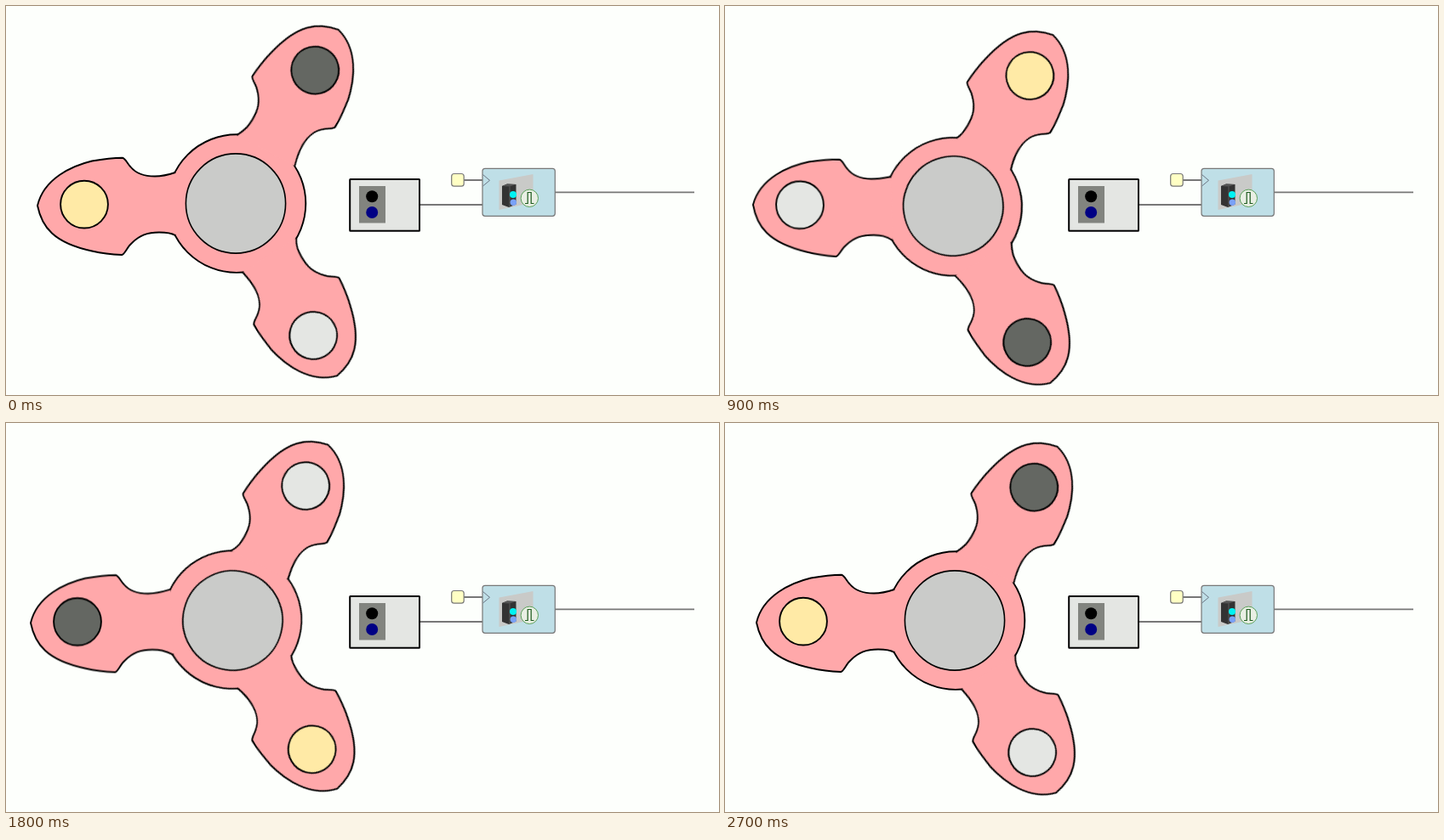
These frames come from a looping animation (838x458 px, 3600 ms). An HTML page:

```html
<!DOCTYPE html>
<html lang="en">
<head>
<meta charset="utf-8">
<title>Spinner and light sensor</title>
<style>
  html, body { margin: 0; width: 100%; height: 100%; overflow: hidden; background: #fdfffc; }
  svg { display: block; width: 838px; height: 458px; }
  #spinner { transform-origin: 268.25px 233.5px; }
  #pulse { opacity: 0; }
</style>
</head>
<body>
<svg viewBox="0 0 838 458" fill="none">
  <g id="wires" stroke="#777" stroke-width="1.8">
    <path d="M486 234H560M645 219.4H809M538 205H560"/>
  </g>

  <g id="sensor">
    <rect x="404.2" y="204" width="81.8" height="60.8" rx=".5" fill="#e4e6e3" stroke="#000" stroke-width="2"/>
    <rect x="415" y="212" width="31" height="43.5" fill="#82847f"/>
    <circle cx="430.2" cy="224.3" r="7" fill="#000"/>
    <circle cx="430.2" cy="243" r="7" fill="#000084"/>
  </g>

  <g id="block">
    <rect x="523.7" y="197.5" width="14.5" height="14.7" rx="3" fill="#ffffc4" stroke="#777" stroke-width="1.2"/>
    <rect x="560" y="191.3" width="85.3" height="56" rx="3" fill="#bfdfe7" stroke="#777" stroke-width="1.2"/>
    <path d="M560.5 198.5L568.5 205.3L560.5 212" stroke="#6b7684"/>
    <path d="M579.5 205.5L619.5 198V231.5L579.5 240Z" fill="#c9cac8"/>
    <path d="M583 212L589 209.5L599.5 210V233.5L591 237L583 234Z" fill="#333"/>
    <path d="M583 212L589 209.5L599.5 210L592 212.5Z" fill="#555"/>
    <path d="M592 212.5V236.5" stroke="#666" stroke-width=".8"/>
    <circle cx="596" cy="222" r="4" fill="#00f2f2"/>
    <circle cx="596.3" cy="231.3" r="3.7" fill="#7aa2f8"/>
    <circle cx="615.3" cy="226.3" r="10.2" fill="#e9efe4" stroke="#5aa05a"/>
    <path d="M610 232.5H613.2V219.5H617.2V232.5H620.5" stroke="#1d5a1d" stroke-width="1.2"/>
  </g>

  <g id="pulse">
    <path d="M686.2 214.5V155.8H701.2V214.5" stroke="#008000" stroke-width="3"/>
    <ellipse cx="677.7" cy="214.4" rx="9.5" ry="3.4" fill="#008000"/>
    <ellipse cx="709.5" cy="214.4" rx="9.5" ry="3.4" fill="#008000"/>
    <path d="M691 166.3V171.3M696 166.3V171.3M689 179.3Q693.3 185.3 697.8 179.3" stroke="#1a6a1a"/>
  </g>

  <g id="spinner" stroke="#000" stroke-width="1.9" fill="#ffa8aa">
    <circle cx="271" cy="232.6" r="81.3"/>
    <g id="arms"></g>
    <circle cx="270" cy="232.5" r="58.6" fill="#cacbc9" stroke-width="1.6"/>
  </g>
</svg>

<script>
const LOOP = 3600, BEAT = 450, TICK = 150;
const $ = id => document.getElementById(id);

// One arm pointing left; only its joints with the hub differ.
const armPath = (top, bottom) =>
  `M${top}C190 199 184 200.5 175 200.5C160 200.5 151 195 146.5 189.5` +
  'C143 186 140 179 137 178.7C123 179 110 181 101 182.5' +
  'C78 188 44.5 203 37 235C42 260 56 279 101 288.5' +
  'C110 290.5 125 292.5 136 293C140 292 142 284 148 279' +
  `C157 270 166 266.5 180 266.5C188 266.5 194 267 ${bottom}`;

const arms = [
  { turn: 0, shift: '', top: '199 196', bottom: '199 270', weight: '#ffeaa6' },
  { turn: -120.8, shift: 'translate(-4 -1) rotate(1.7 37 235)', top: '198 197.2', bottom: '202 272', weight: '#e4e6e3' },
  { turn: 121.2, shift: 'translate(-8 .4)', top: '201 195.7', bottom: '205 272.6', weight: '#646762' }
];

$('arms').innerHTML = arms.map(a => `
  <g transform="rotate(${a.turn} 268.25 233.5) ${a.shift}">
    <path d="${armPath(a.top, a.bottom)}"/>
    <circle cx="92" cy="233.6" r="27.9" fill="${a.weight}"/>
  </g>`).join('');

// Each step holds its value until the next one.
function play(id, steps) {
  const frames = steps.map(([time, style]) =>
    ({ offset: time / LOOP, easing: 'steps(1, end)', ...style }));
  $(id).animate([...frames, { ...steps.at(-1)[1], offset: 1 }],
    { duration: LOOP, iterations: Infinity });
}

const turns = [0, 60, 120.8, 181.4, 238.8, 302.4, 360].map((angle, i) =>
  [i * BEAT, { transform: `rotate(${angle}deg)` }]);

const walk = (x, opacity) => ({ transform: `translateX(${x}px)`, opacity });
const pulses = [[0, walk(0, 0)]];
for (const start of [1, 3, 5].map(i => i * BEAT)) {
  pulses.push(
    [start, walk(0, 1)],
    [start + TICK, walk(69.5, 1)],
    [start + 2 * TICK, walk(0, 0)]);
}

play('spinner', turns);
play('pulse', pulses);
</script>
</body>
</html>
```
